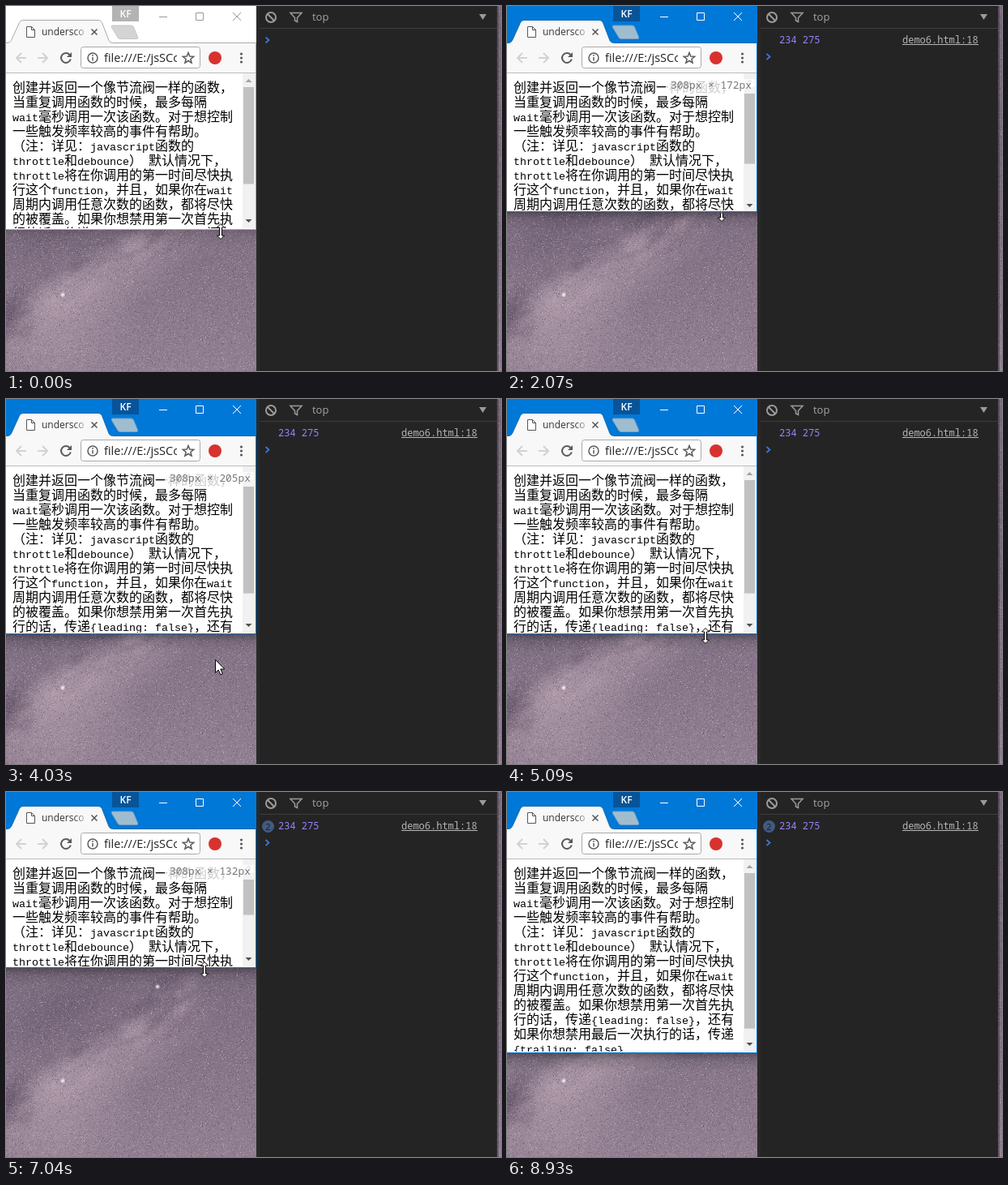
Animation, 611 px wide and 450 px high, one loop 9.21 s. Source, as an HTML page with a canvas:

```html
<!DOCTYPE html>
<html lang="zh-CN">
<head>
<meta charset="utf-8">
<title>Throttled resize</title>
<style>
html, body { margin: 0; width: 100%; height: 100%; overflow: hidden; background: #242424; }
canvas, svg { position: absolute; left: 0; top: 0; display: block; }
text { white-space: pre; }
.ui { font-family: "Open Sans", "Noto Sans", sans-serif; }
.mono { font-family: "Noto Sans Mono", "DejaVu Sans Mono", monospace; }
.han { font: 16px "Noto Sans CJK SC", "Noto Sans CJK", sans-serif; }
.latin { font: 13.33px "Liberation Mono", monospace; }
</style>
</head>
<body>
<canvas id="sky" width="611" height="450"></canvas>
<svg width="611" height="450" viewBox="0 0 611 450">
  <defs>
    <linearGradient id="down" x2="0" y2="1"><stop stop-opacity=".32"/><stop offset=".4" stop-opacity=".1"/><stop offset="1" stop-opacity="0"/></linearGradient>
    <linearGradient id="fade" gradientUnits="userSpaceOnUse" x1="84" x2="100"><stop stop-color="#333"/><stop offset="1" stop-color="#333" stop-opacity=".15"/></linearGradient>
    <clipPath id="pageClip"><rect id="pageBox" y="83" width="308"/></clipPath>
    <clipPath id="urlClip"><rect x="120" y="52" width="91" height="24"/></clipPath>
  </defs>

  <g id="console">
    <rect x="309" width="297" height="450" fill="#242424"/>
    <path d="M309 27.500h297" stroke="#3d3d3d"/>
    <rect x="309" width="4" height="450" fill="#292929"/>
    <g fill="none" stroke="#9b9b9b" stroke-width="2">
      <circle cx="327" cy="14" r="6"/>
      <path d="M323 10l8 8"/>
      <path d="M351 8.500h14l-5.500 6v5l-3 -1.500v-3.500z" stroke-width="1.500"/>
    </g>
    <text class="ui" x="378" y="18" font-size="13" fill="#a5a5a5">top</text>
    <path d="M584 10h9l-4.500 7z" fill="#9b9b9b"/>
    <g id="log" class="mono" font-size="12">
      <text x="336" y="46" fill="#9980ff">234 275</text>
      <text x="488" y="46" fill="#b5b5b5">demo6.html:18</text>
      <path d="M488 47.500h94" stroke="#b5b5b5"/>
    </g>
    <g id="badge">
      <circle cx="323.500" cy="42.500" r="7.500" fill="#425a80"/>
      <text class="ui" x="323.500" y="46.500" font-size="11" text-anchor="middle" fill="#1d1d1d">2</text>
    </g>
    <path id="prompt" d="M320.500 38.500l4 3.500l-4 3.500" fill="none" stroke="#3b78d8" stroke-width="1.700"/>
  </g>

  <rect id="shade" width="309" height="22" fill="url(#down)"/>

  <g id="window">
    <rect id="black" y="83" width="309"/>
    <rect id="white" width="309" fill="#fff"/>
    <rect id="title" width="309" height="46"/>
    <path id="newTab" d="M131.500 24h23q2 0 3 2l5 12q1 2.500-1.500 2.500h-20q-2.500 0-3.500-2.500l-7-11.500q-1-2.500 1-2.500z"/>
    <rect id="user" x="131" width="33" height="19"/>
    <text class="ui" x="147.500" y="14" font-size="12" font-weight="600" text-anchor="middle" fill="#fff">KF</text>
    <path id="buttons" d="M189 13.500h10M234.500 8.500h9v9h-9zM280 8l10 10M290 8l-10 10" fill="none"/>
    <rect y="45" width="308" height="38" fill="#f8f8f8"/>
    <path id="tab" d="M0 45.500h2q3 0 4.500-3l10-22q1.500-3 4.500-3h93q3 0 4.500 3l8.500 22q1.500 3 4.500 3h177" fill="#f8f8f8"/>
    <path d="M0 82.500h308" stroke="#bdbdbd"/>
    <path d="M25.500 25.500h6l4 4v9h-10zM31.500 25.500v4h4" fill="#fff" stroke="#555"/>
    <text class="ui" x="44" y="36" font-size="12" fill="url(#fade)">undersco</text>
    <path d="M105.500 28.500l7 7m0-7l-7 7" stroke="#555" stroke-width="1.500"/>
    <g fill="none" stroke="#d2d2d2" stroke-width="2">
      <path d="M25 64h-12m6-6l-6 6l6 6M39 64h12m-6-6l6 6l-6 6"/>
      <path d="M78.500 60a6 6 0 1 0 1.300 5.500" stroke="#5a5a5a"/>
    </g>
    <path d="M81 57v6h-6z" fill="#5a5a5a"/>
    <rect x="92.500" y="50.500" width="147" height="26" rx="3" fill="#fff" stroke="#a9a9a9"/>
    <circle cx="107" cy="64" r="6" fill="none" stroke="#5a5a5a" stroke-width="1.500"/>
    <path d="M107 63v4.500M107 60v1.700" stroke="#5a5a5a" stroke-width="1.500"/>
    <text class="ui" x="121" y="68.500" font-size="14.500" fill="#222" clip-path="url(#urlClip)">file:///E:/jsSCode</text>
    <path id="star" fill="none" stroke="#5a5a5a" stroke-width="1.500"/>
    <circle cx="258" cy="64" r="8" fill="#d8322f"/>
    <path d="M290.500 59v0m0 5v0m0 5v0" stroke="#5a5a5a" stroke-width="3.200" stroke-linecap="round"/>
    <g clip-path="url(#pageClip)">
      <g id="article"></g>
      <rect id="track" x="292" y="83" width="16" fill="#f1f1f1"/>
      <rect id="thumb" x="293" y="100" width="13" fill="#c1c1c1"/>
      <path d="M295.500 94h8l-4-4z" fill="#a3a3a3"/>
      <path id="arrowDown" d="M295.500-2h8l-4 4z" fill="#505050"/>
      <g id="tip">
        <rect x="196" y="90" width="110" height="18" fill="#fff" fill-opacity=".8"/>
        <text id="size" class="mono" x="202" y="101.500" font-size="12.800" fill="#777"></text>
      </g>
    </g>
    <path id="frame" fill="none"/>
  </g>

  <g id="resizer" fill="#fff" stroke="#000">
    <path id="upper" d="M-1.500 0v-5h-3l4.500-4.500l4.500 4.500h-3v5"/>
    <path d="M-1.500 0v5h-3l4.500 4.500l4.500-4.500h-3v-5"/>
  </g>
  <path id="pointer" d="M.5.5v16l3.700-3.500l2.600 5.800l2.500-1.100l-2.500-5.700h5z" fill="#fff" stroke="#000"/>
</svg>
<script>
const $ = id => document.getElementById(id);
const set = (id, attrs) => { for (const k in attrs) $(id).setAttribute(k, attrs[k]); };
const show = (id, on) => set(id, { visibility: on ? "visible" : "hidden" });

const LOOP = 9210;
const progress = (t, from, to) => Math.min(1, Math.max(0, (t - from) / (to - from)));
const linear = u => u;
const easeIn = u => u * u;
const easeOut = u => 1 - (1 - u) ** 2;

// Spells of movement, each refreshed in a number of equal steps.
const spells = [
  { from: 1240, to: 5090, steps: 28 },
  { from: 5650, to: 6590, steps: 7 },
  { from: 6920, to: 8090, steps: 9 }];

const drags = [
  { from: 1240, to: 2780, by: -75, ease: easeIn },
  { from: 2900, to: 3600, by: 89, ease: linear },
  { from: 5650, to: 6590, by: -73, ease: easeOut },
  { from: 6920, to: 7670, by: 105, ease: easeOut }];

function held(t) {
  const s = spells.filter(s => s.from <= t).pop();
  if (!s) return 0;
  const u = progress(t, s.from, s.to);
  return s.from + Math.floor(u * s.steps) / s.steps * (s.to - s.from);
}

const bottomAt = t => Math.round(drags.reduce(
  (y, d) => y + d.by * d.ease(progress(t, d.from, d.to)), 275));

function cursorAt(t, bottom) {
  const roam = progress(t, 3700, 5090), leave = progress(t, 7690, 7940);
  return {
    x: 265 - 20 * easeOut(roam) - 14 * leave,
    y: bottom + 3 + 129 * Math.sin(Math.PI * roam) ** 3 + 60 * leave,
    arrow: (roam > 0 && roam < 1) || leave > 0
  };
}

const lines = [
  "创建并返回一个像节流阀一样的函数，",
  "当重复调用函数的时候，最多每隔",
  "wait毫秒调用一次该函数。对于想控制",
  "一些触发频率较高的事件有帮助。",
  "（注：详见：javascript函数的",
  "throttle和debounce） 默认情况下，",
  "throttle将在你调用的第一时间尽快执",
  "行这个function，并且，如果你在wait",
  "周期内调用任意次数的函数，都将尽快",
  "的被覆盖。如果你想禁用第一次首先执",
  "行的话，传递{leading: false}，还有",
  "如果你想禁用最后一次执行的话，传递",
  "{trailing: false}"];

function addText(x, y, cls, str) {
  const el = document.createElementNS("http://www.w3.org/2000/svg", "text");
  el.textContent = str;
  el.setAttribute("class", cls);
  el.setAttribute("x", x);
  el.setAttribute("y", y);
  $("article").append(el);
}

lines.forEach((line, row) => {
  let x = 8;
  for (const run of line.match(/[ -~]+|[^ -~]+/g)) {
    const latin = run.charCodeAt(0) < 128;
    addText(x, 106 + row * 18, latin ? "latin" : "han", run);
    x += run.length * (latin ? 8 : 16);
  }
});

const starPoints = Array.from({ length: 10 }, (_, i) => {
  const r = i % 2 ? 3 : 7, a = i * Math.PI / 5;
  return `${225 + r * Math.sin(a)} ${64.5 - r * Math.cos(a)}`;
});
set("star", { d: "M" + starPoints.join("L") + "z" });

function paintSky() {
  const c = $("sky").getContext("2d");
  let seed = 7;
  const rnd = () => (seed = seed * 16807 % 2147483647) / 2147483647;
  const blob = (x, y, rx, ry, rgb, alpha) => {
    c.save();
    c.translate(x, y);
    c.rotate(-.55);
    c.scale(rx, ry);
    const g = c.createRadialGradient(0, 0, 0, 0, 0, 1);
    g.addColorStop(0, `rgba(${rgb},${alpha})`);
    g.addColorStop(1, `rgba(${rgb},0)`);
    c.fillStyle = g;
    c.fillRect(-1, -1, 2, 2);
    c.restore();
  };
  const dark = "92,76,96", pale = "186,164,178";

  const base = c.createLinearGradient(0, 200, 0, 450);
  base.addColorStop(0, "#7a6a7d");
  base.addColorStop(1, "#918092");
  c.fillStyle = base;
  c.fillRect(0, 0, 611, 450);
  blob(70, 270, 120, 45, dark, .35);
  blob(200, 282, 40, 22, dark, .6);
  blob(110, 350, 180, 45, pale, .5);
  blob(60, 365, 60, 32, pale, .5);
  blob(70, 420, 110, 60, pale, .4);
  blob(6, 385, 34, 36, dark, .8);

  // Ragged clouds along the diagonal band.
  for (let i = 0; i < 90; i++) {
    const u = rnd(), off = (rnd() - .4) * 70;
    blob(10 + 220 * u, 375 - 145 * u + off, 8 + rnd() * 18, 4 + rnd() * 9,
      off < 0 ? dark : pale, .1 + rnd() * .15);
  }

  const grain = (x, y, w, h, n) => {
    for (let i = 0; i < n; i++) {
      const rgb = rnd() < .5 ? "228,212,226" : "58,44,62";
      c.fillStyle = `rgba(${rgb},${rnd() * .3})`;
      c.fillRect(x + Math.floor(rnd() * w), y + Math.floor(rnd() * h), 1, 1);
    }
  };
  grain(0, 195, 309, 255, 30000);
  grain(606, 0, 5, 450, 900);
  for (let i = 0; i < 500; i++) {
    c.fillStyle = `rgba(240,230,240,${.2 + rnd() * .4})`;
    c.fillRect(Math.floor(rnd() * 309), 200 + Math.floor(rnd() * 250), 1, 1);
  }
  blob(187, 240, 3.5, 3.5, "255,250,255", 1);
  blob(70, 356, 3.5, 3.5, "255,250,255", 1);
  c.fillStyle = "rgba(30,22,36,.4)";
  c.fillRect(606, 0, 2, 450);
}

function draw(now) {
  const t = now % LOOP, step = held(t);
  const bottom = bottomAt(step);
  const painted = bottomAt(step - 50);
  const shrinking = painted > bottom;
  // Page layout trails the window frame, more so while it grows.
  const foot = (shrinking ? painted : bottomAt(step - 130)) - 1;
  const view = foot - 83;
  const active = t >= 940, logged = t >= 1240;
  const cursor = cursorAt(step, bottom);

  set("title", { fill: active ? "#0078d7" : "#fff" });
  set("newTab", { fill: active ? "#a0bdd0" : "#d4d4d4", stroke: active ? "#6f9fc4" : "#c6c6c6" });
  set("user", { fill: active ? "#07549a" : "#b3b3b3" });
  set("buttons", { stroke: active ? "#fff" : "#999" });
  set("tab", { stroke: active ? "#1069b3" : "#aaa" });

  set("black", { height: bottom - 83 });
  set("white", { height: Math.min(painted, bottom) });
  set("pageBox", { height: Math.min(foot, bottom) - 83 });
  set("track", { height: view });
  set("thumb", { height: (view - 34) * view / 251 });
  set("arrowDown", { transform: `translate(0 ${foot - 9})` });
  $("size").textContent = `308px × ${view}px`;
  show("tip", (t >= 1240 && t < 4820) || (t >= 5650 && t < 8930));

  set("frame", {
    d: `M308.5 ${active ? 0 : 46}V${bottom}M0 ${bottom + .5}h309`,
    stroke: active ? "#0078d7" : "#a8a8a8"
  });
  set("shade", { y: bottom + 1, opacity: active ? 1 : .45 });

  show("log", logged);
  show("badge", t >= 5650);
  set("prompt", { transform: `translate(0 ${logged ? 20.5 : 0})` });

  const at = { transform: `translate(${Math.round(cursor.x)} ${Math.round(cursor.y)})` };
  const visible = t < 8090;
  set("pointer", at);
  set("resizer", at);
  show("pointer", visible && cursor.arrow);
  show("resizer", visible && !cursor.arrow);
  // While shrinking, the page repaints over the cursor's upper half.
  set("upper", { opacity: shrinking ? .2 : 1 });
}

paintSky();
const start = performance.now();
function loop() {
  draw(performance.now() - start);
  requestAnimationFrame(loop);
}
loop();
</script>
</body>
</html>
```
